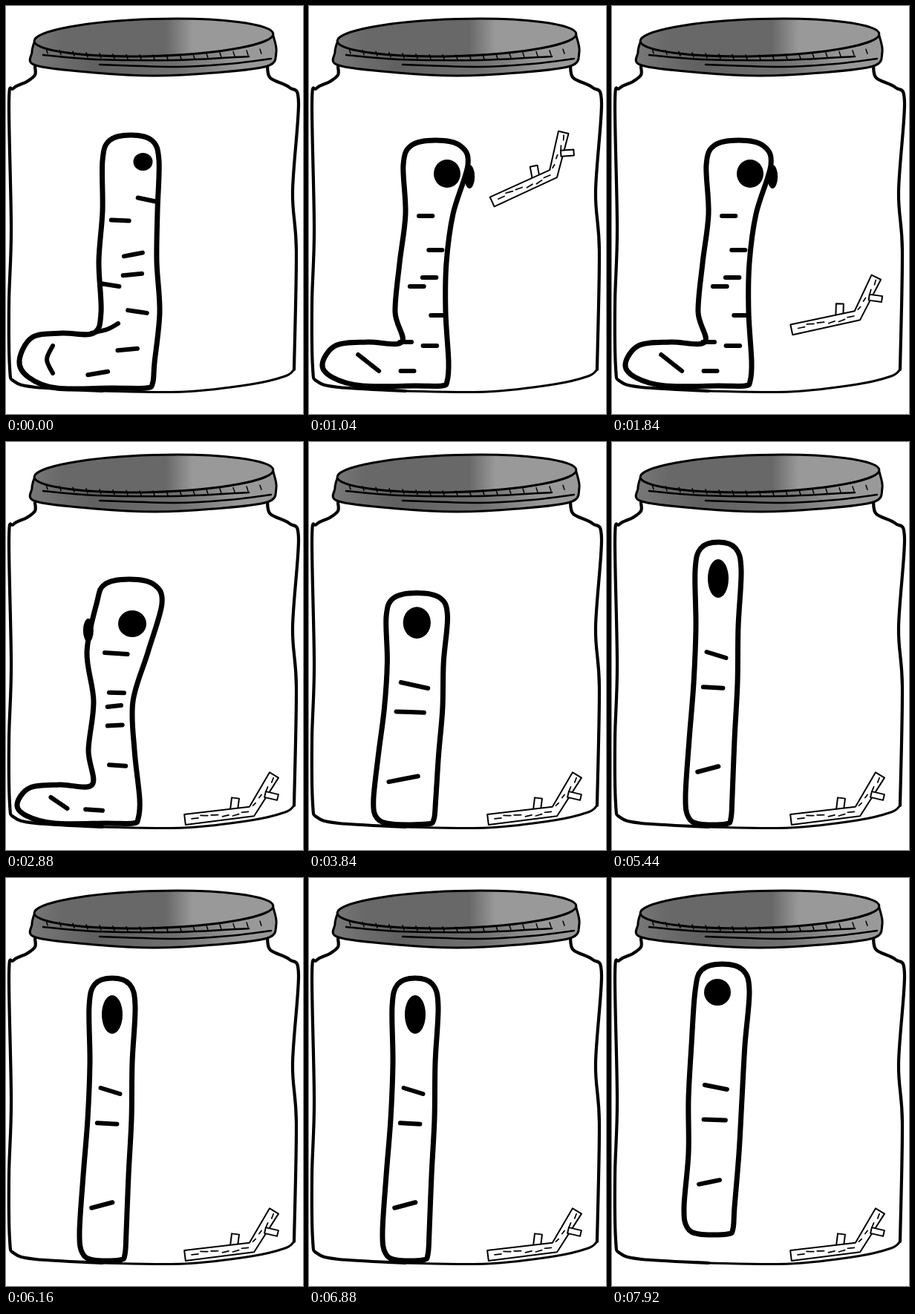
Write an HTML page with a canvas that moves like this. It is 400x550 px and loops after 8000 ms.

```html
<!DOCTYPE html>
<html lang="en">
<head>
<meta charset="utf-8">
<title>Worm in a jar</title>
<style>
  html, body { margin: 0; width: 100%; height: 100%; overflow: hidden; background: #fff; }
  canvas { display: block; width: 100vw; height: 100vh; }
</style>
</head>
<body>
<canvas id="stage" width="400" height="550"></canvas>
<script>
const LOOP = 8000, STEP = 80;
const ctx = document.getElementById('stage').getContext('2d');

// A pose gives the trunk's edges at five even heights, its eye, and its dashes as [y, position across].
// span is a dash's share of the trunk's width; side is where the second eye peeks out.
const rest = {
  top: 174, bottom: 515, left: [130, 130, 125, 128, 118], right: [206, 204, 203, 207, 200],
  eye: [184.5, 210, 13, 12], side: 0, span: 0.4, tilt: 5,
  dashes: [[261, 0.8], [289, 0.33], [335, 0.59], [362, 0.57], [376, 0.17], [412, 0.62], [463, 0.53], [495, 0.07]],
  foot: { reach: 18, top: 441, lean: 0, fold: 36 }
};
const watch = {
  top: 181, bottom: 512, left: [127, 130, 122, 116, 125], right: [214, 194, 185, 184, 188],
  eye: [186, 226, 18, 19], side: 1, span: 0.38, tilt: 0,
  dashes: [[283, 0.43], [329, 0.73], [366, 0.65], [378, 0.4], [417, 0.85], [458, 0.63], [492, 0.12]],
  foot: { reach: 18, top: 453, lean: 28, fold: 16 }
};
const turn = {
  top: 185, bottom: 514, left: [122, 109, 118, 111, 116], right: [210, 191, 171, 173, 180],
  eye: [170, 245, 19, 18], side: -1, span: 0.45, tilt: 2,
  dashes: [[285, 0.48], [338, 0.56], [356, 0.53], [382, 0.56], [436, 0.6], [496, 0.04]],
  foot: { reach: 15, top: 462, lean: 22, fold: 0 }
};
const stand = {
  top: 135, bottom: 515, left: [112, 113, 110, 104, 99], right: [174, 170, 169, 165, 162],
  eye: [143, 184, 14, 26], side: 0, span: 0.55, tilt: 8,
  dashes: [[287, 0.5], [331, 0.45], [441, 0.45]], foot: null
};
const air = {
  top: 116, bottom: 480, left: [112, 107, 103, 103, 97], right: [185, 179, 175, 171, 165],
  eye: [142, 154, 18, 18], side: 0, span: 0.5, tilt: 6,
  dashes: [[282, 0.5], [326, 0.5], [410, 0.46]], foot: null
};

// Blends numbers, lists and objects; whatever does not pair up switches halfway.
function mix(a, b, k) {
  if (typeof a === 'number') return a + (b - a) * k;
  if (!a || !b || a.length !== b.length) return k < 0.5 ? a : b;
  if (Array.isArray(a)) return a.map((v, i) => mix(v, b[i], k));
  return Object.fromEntries(Object.keys(a).map(key => [key, mix(a[key], b[key], k)]));
}

// Scales a pose about its axis and its bottom edge, then lifts it.
function remap(pose, wide, tall, lift) {
  const fx = x => 136 + (x - 136) * wide;
  const fy = y => pose.bottom + (y - pose.bottom) * tall - lift;
  const [cx, cy, rx, ry] = pose.eye;
  return {
    ...pose, top: fy(pose.top), bottom: fy(pose.bottom), left: pose.left.map(fx), right: pose.right.map(fx),
    eye: [fx(cx), fy(cy), rx * wide, ry * tall], dashes: pose.dashes.map(([y, u]) => [fy(y), u])
  };
}
const squash = remap(stand, 1.33, 0.82, 0);
const peak = remap(air, 1, 1, 4);
const hop = [squash, mix(squash, stand, 0.5), stand, mix(stand, air, 0.6), peak, peak, air, mix(squash, stand, 0.6)];

function wormPose(t) {
  if (t < 240) return rest;
  if (t < 2000) return mix(rest, watch, Math.min(1, (t - 160) / 480));
  if (t < 2880) return mix(watch, turn, Math.min(0.3, (t - 1920) / 800));
  if (t < 3040) return turn;
  if (t < 3200) return rest;
  if (t < 3280) return mix(rest, stand, 0.5);
  return hop[Math.min(7, Math.floor((t - 3120) % 720 / STEP))];
}

// Catmull-Rom curve through a list of points.
function curve(points, closed) {
  const n = points.length;
  const at = i => points[closed ? (i + n) % n : Math.max(0, Math.min(n - 1, i))];
  const path = new Path2D();
  path.moveTo(...at(0));
  for (let i = 0; i < (closed ? n : n - 1); i++) {
    const [a, b, c, d] = [at(i - 1), at(i), at(i + 1), at(i + 2)];
    path.bezierCurveTo(b[0] + (c[0] - a[0]) / 6, b[1] + (c[1] - a[1]) / 6,
      c[0] - (d[0] - b[0]) / 6, c[1] - (d[1] - b[1]) / 6, c[0], c[1]);
  }
  return path;
}

function ink(path, width, fill) {
  if (fill) { ctx.fillStyle = fill; ctx.fill(path); }
  ctx.lineWidth = width;
  ctx.stroke(path);
}

function oval(x, y, rx, ry, turned = 0) {
  const path = new Path2D();
  path.ellipse(x, y, rx, ry, turned, 0, 2 * Math.PI);
  return path;
}

function shade(...stops) {
  const g = ctx.createLinearGradient(36, 0, 362, 0);
  stops.forEach(([at, color]) => g.addColorStop(at, color));
  return g;
}

const jarLeft = curve([[39, 82], [39, 93], [28, 102], [10, 111], [4, 130], [7, 300], [4, 400], [5, 488], [11, 506], [40, 514], [130, 519]]);
const jarRight = curve([[352, 80], [356, 97], [382, 110], [394, 130], [386, 250], [391, 330], [388, 490]]);
const jarBase = curve([[388, 490], [376, 499], [330, 510], [240, 520], [130, 519]]);
const lidRim = curve([[39, 46], [35, 62], [40, 80], [120, 90], [200, 94], [280, 90], [352, 81], [364, 62], [360, 40]]);
const lidTop = oval(199, 42.5, 161, 25, -0.03);
const rimShade = shade([0, '#777'], [0.25, '#606060'], [0.6, '#707070'], [0.85, '#999']);
const topShade = shade([0, '#777'], [0.12, '#686868'], [0.55, '#686868'], [0.66, '#999']);

function drawJar() {
  ink(jarLeft, 4.2);
  ink(jarRight, 4.2);
  ink(jarBase, 3);
  ink(lidRim, 3, rimShade);
  ink(lidTop, 3, topShade);
  ink(curve([[50, 66], [120, 72], [230, 73], [327, 68]]), 2.5);
  ink(curve([[126, 79], [230, 82], [300, 78], [357, 71]]), 2.5);
  for (let x = 54; x < 350; x += 18) {
    const y = 67 - ((x - 200) / 60) ** 2 * 1.4;
    ink(curve([[x, y - 1], [x + 2, y + 5]]), 1.5);
  }
}

function wormOutline({ top, bottom, left, right, foot }) {
  const h = bottom - top, w = right[0] - left[0], base = right[4] - left[4];
  const rows = edge => edge.map((x, i) => [x, top + h * (0.1 + 0.2 * i)]);
  const shoulder = top + 0.022 * h;
  const points = [
    [left[0] + 0.12 * w, shoulder], [left[0] + 0.5 * w, top], [right[0] - 0.12 * w, shoulder],
    ...rows(right),
    [right[4] - 0.03 * base, bottom - 0.02 * h], [right[4] - 0.14 * base, bottom], [left[4] + 0.3 * base, bottom]
  ];
  if (foot) {
    const length = left[4] - foot.reach, height = bottom - foot.top;
    const toe = (u, v) => [foot.reach + u * length, foot.top + v * height];
    points.push(toe(0.5, 1), toe(0.12, 0.8), toe(0, 0.5), toe(0.17, 0.08), toe(0.57, 0), toe(1, 0));
  } else {
    points.push([left[4] + 0.06 * base, bottom - 0.025 * h], rows(left)[4]);
  }
  return curve([...points, ...rows(left).slice(0, 4).reverse()], true);
}

function edgeAt(pose, edge, y) {
  const row = Math.max(0, Math.min(4, ((y - pose.top) / (pose.bottom - pose.top) - 0.1) / 0.2));
  const i = Math.min(3, Math.floor(row));
  return mix(edge[i], edge[i + 1], row - i);
}

function drawWorm(pose) {
  const { left, right, foot, eye, side } = pose;
  ink(wormOutline(pose), 7, '#fff');

  pose.dashes.forEach(([y, u], i) => {
    const l = edgeAt(pose, left, y), r = edgeAt(pose, right, y);
    const x = mix(l, r, u), half = (r - l) * pose.span / 2 - 3, rise = pose.tilt * Math.cos(i * 1.4) / 2;
    ink(curve([[x - half, y - rise], [x + half, y + rise]]), 6);
  });

  if (foot) {
    const x = mix(foot.reach, left[4], 0.45), y1 = foot.top + 17, y2 = pose.bottom - 20;
    const bow = foot.lean ? 0 : 8;
    ink(curve([[x, y1], [x + foot.lean / 2 - bow, (y1 + y2) / 2], [x + foot.lean, y2]]), 6);
    if (foot.fold) {
      const fx = left[4] - 3, rise = foot.fold > 30 ? 13 : 0;
      ink(curve([[fx, foot.top], [fx + foot.fold * 0.6, foot.top - rise * 0.4], [fx + foot.fold, foot.top - rise]]), 6);
    }
  }

  ctx.fillStyle = '#000';
  ctx.fill(oval(...eye));
  if (side) {
    const y = eye[1] + 4 - 5 * Math.min(0, side);
    const x = side > 0 ? edgeAt(pose, right, y) + 7 : edgeAt(pose, left, y) - 4;
    ctx.fill(oval(x, y, 7, 16));
  }
}

// The twig is drawn where it lands, then turned about its elbow while it falls.
const tail = [241, 509], elbow = [331, 498], tip = [361, 449];

function limb(points, width) {
  const offset = sign => points.map(([x, y], i) => {
    const a = points[Math.max(0, i - 1)], b = points[Math.min(points.length - 1, i + 1)];
    const dx = b[0] - a[0], dy = b[1] - a[1], k = sign * width / 2 / Math.hypot(dx, dy);
    return [x - dy * k, y + dx * k];
  });
  const path = new Path2D();
  [...offset(1), ...offset(-1).reverse()].forEach(p => path.lineTo(...p));
  path.closePath();
  ink(path, 2, '#fff');
}

function drawTwig(t) {
  if (t < 240) return;
  const fall = Math.min(1, (t - 240) / 1920) ** 1.14;
  ctx.save();
  ctx.translate(327 + 3 * fall, 68 + 430 * fall);
  ctx.rotate((fall - 1) * 28 * Math.PI / 180);
  ctx.translate(-330, -498);
  limb([[307, 496], [309, 480]], 10);
  limb([tail, elbow, tip], 14);
  limb([[349, 475], [366, 479]], 8);
  for (let i = 0; i < 10; i++) {
    const [a, b, u] = i < 6 ? [tail, elbow, 0.1 + i * 0.15] : [elbow, tip, 0.1 + (i - 6) * 0.25];
    const drift = 3 * Math.sin(i * 5);
    const point = (k, d) => [mix(a[0], b[0], k) + d / 2, mix(a[1], b[1], k) + d];
    ink(curve([point(u, drift), point(u + 0.1, drift / 2)]), 1.7);
  }
  ctx.restore();
}

function draw(now) {
  const t = Math.floor(now % LOOP / STEP) * STEP;
  ctx.fillStyle = '#fff';
  ctx.fillRect(0, 0, 400, 550);
  ctx.strokeStyle = '#000';
  ctx.lineCap = ctx.lineJoin = 'round';
  drawJar();
  drawWorm(wormPose(t));
  drawTwig(t);
}

const start = performance.now();
function frame() {
  draw(performance.now() - start);
  requestAnimationFrame(frame);
}
frame();
</script>
</body>
</html>
```
